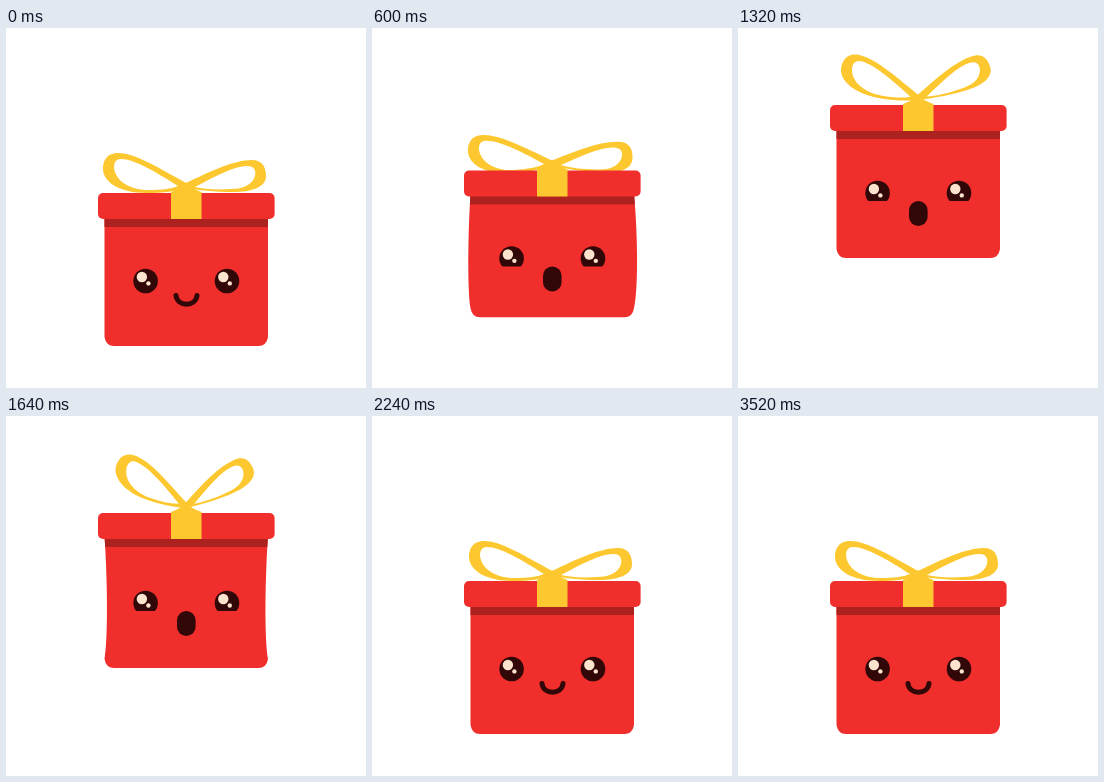
Animation, 360 px wide and 360 px high, one loop 3.56 s. Source, as an HTML page:

```html
<!DOCTYPE html>
<html lang="en">
<head>
<meta charset="utf-8">
<title>Jumping gift</title>
<style>
  html, body { margin: 0; width: 100%; height: 100%; overflow: hidden; background: #fff; }
  svg { display: block; width: 100vw; height: 100vh; }
  .red { fill: #f02f2c; }
  .gold { fill: #fdc82f; fill-rule: evenodd; }
  .dark { fill: #310707; }
  .shine { fill: #fbe3cd; }
  .line { fill: none; stroke: #310707; stroke-linecap: round; }
</style>
</head>
<body>
<svg viewBox="0 0 360 360">
  <defs>
    <clipPath id="bodyClip"><path id="clipShape"/></clipPath>
    <g id="eye">
      <circle class="dark" r="12.3"/>
      <circle class="shine" cx="-3.7" cy="-4" r="5.2"/>
      <circle class="shine" cx="2.8" cy="2.4" r="2.2"/>
    </g>
  </defs>
  <g id="gift">
    <path id="body" class="red"/>
    <g clip-path="url(#bodyClip)">
      <rect id="shade" x="85" y="188" width="190" height="11" fill="#ad211e"/>
    </g>
    <g id="face">
      <use href="#eye" x="139.6" y="253"/>
      <use href="#eye" x="221" y="253"/>
      <path id="cheeks" class="red" d="M126 261h27v6h-27z M207 261h28v6h-28z"/>
      <path id="smile" class="line" stroke-width="5" d="M170 267.5C171 279 190 279 191 267.5"/>
      <path id="dash" class="line" stroke-width="6" d="M178.7 276.3L188.4 273.7"/>
      <rect id="gasp" class="dark" x="171" y="261" width="18.6" height="25" rx="9.3"/>
    </g>
    <g id="lid">
      <g transform="translate(180 158)" class="gold">
        <path id="bowL" d="M0-3C-30-20-52-33-68-33C-80-33-83-24-83-17C-83-4-66 7-40 7C-22 7-10 5 0 2Z
          M-8 0C-30-14-52-27-65-27C-72-27-73-20-71-14C-67-2-52 4-38 4C-25 4-15 3-8 0Z"/>
        <path id="bowR" d="M0-3C25-15 48-26 66-26C77-26 80-18 80-10C80 2 64 6 48 6C28 6 12 4 0 2Z
          M9 1C30-10 48-20 61-20C69-20 70-15 69-10C66 0 55 3 45 3C30 4 18 3 9 1Z"/>
      </g>
      <rect class="red" x="92" y="165" width="176.6" height="26" rx="5"/>
      <path class="gold" d="M165 164Q176 160 180 154Q184 160 195.5 164V191H165Z"/>
    </g>
  </g>
</svg>
<script>
const LOOP = 3560, STEP = 40;
const TAKEOFF = 548, LANDING = 1816, HEIGHT = 88;

const $ = id => document.getElementById(id);
const place = (id, value) => $(id).setAttribute("transform", value);
const drop = (id, y) => place(id, `translate(0 ${y})`);
const show = (id, on) => $(id).setAttribute("visibility", on ? "visible" : "hidden");

const ratio = (t, a, b) => Math.min(1, Math.max(0, (t - a) / (b - a)));
const ease = (t, a, b) => { const u = ratio(t, a, b); return u * u * (3 - 2 * u); };
const pulse = (t, a, peak, b) => ease(t, a, peak) - ease(t, peak, b);

// Fast launch, hang, then a matching accelerating fall.
function jump(t) {
  const rise = 1 - (1 - ratio(t, TAKEOFF, TAKEOFF + 420)) ** 3;
  const fall = ratio(t, LANDING - 476, LANDING) ** 3;
  return HEIGHT * (fall - rise);
}

// Lid offset: crouch, stretch on launch and fall, squash on landing.
const lidDrop = t => 17 * pulse(t, 40, 400, 740) - 5 * pulse(t, 620, 800, 1080)
  - 4 * pulse(t, 1560, 1720, 1820) + 13 * pulse(t, 1870, 2020, 2240);

// The sides swell a little ahead of the lid.
const sideBulge = t => 12 * pulse(t, 40, 400, 700) - 9 * pulse(t, 640, 800, 1080)
  - 5 * pulse(t, 1560, 1720, 1820) + 12 * pulse(t, 1830, 1980, 2200);

const bowLift = t => 10 * (ease(t, 840, 1280) - ease(t, 1900, 2240))
  + 13 * pulse(t, 1480, 1740, 2060) - 4 * pulse(t, 480, 620, 960);
const bowSkew = t => 6 * (ease(t, 640, 960) - ease(t, 1500, 1800));

function bodyPath(lid, bulge) {
  const top = 188 + lid, base = 309;
  const high = top + (base - top) * 0.4, low = top + (base - top) * 0.85;
  const left = 98.5 - 4 / 3 * (bulge > 0 ? bulge * 0.7 : bulge);
  const right = 262 + 4 / 3 * bulge;
  return `M98.5 ${top}C${left} ${high} ${left} ${low} 98.5 ${base}Q100 318 108 318`
    + `H252.5Q260.5 318 262 ${base}C${right} ${low} ${right} ${high} 262 ${top}Z`;
}

function draw(t) {
  const lid = lidDrop(t), bulge = sideBulge(t), lift = bowLift(t);
  const size = 1 - 0.0025 * Math.max(0, lift);

  drop("gift", jump(t));
  drop("lid", lid);
  drop("shade", lid);
  drop("face", Math.max(0, lid, bulge * 0.65));
  place("bowL", `rotate(${lift}) scale(${size})`);
  place("bowR", `rotate(${-lift - bowSkew(t)}) scale(${size})`);

  const shape = bodyPath(lid, bulge);
  $("body").setAttribute("d", shape);
  $("clipShape").setAttribute("d", shape);

  const air = t > TAKEOFF && t < LANDING + 40;
  const strain = !air && t > TAKEOFF - 120 && t < LANDING + 200;
  show("cheeks", air);
  show("gasp", air);
  show("dash", strain);
  show("smile", !air && !strain);
}

const start = performance.now();
function tick() {
  const t = (performance.now() - start) % LOOP;
  draw(Math.floor(t / STEP) * STEP);
  requestAnimationFrame(tick);
}
tick();
</script>
</body>
</html>
```
